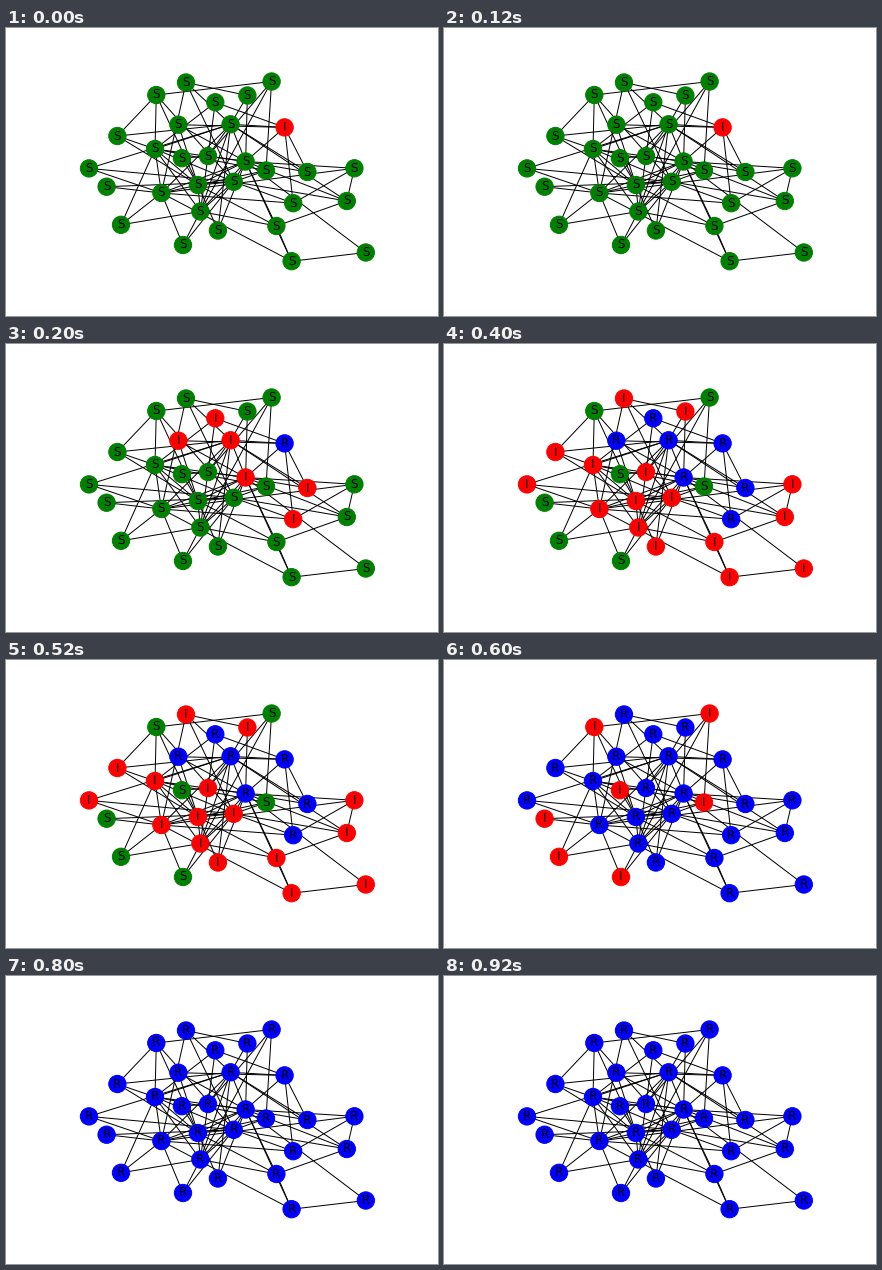
Write a matplotlib script that moves like this. It is 432x288 px and loops after 1000 ms.

```python
import math
import random
import matplotlib.pyplot as plt
from matplotlib.animation import FuncAnimation
from matplotlib.collections import LineCollection

WIDTH, HEIGHT, DPI = 432, 288, 72
STEP_MS = 200
COLORS = {"S": "green", "I": "red", "R": "blue"}

# Key points of the layout, grouped by the step at which they get infected.
WAVES = [
    [(278.6, 99.4)],
    [(209.3, 74.3), (172.4, 96.7), (224.6, 96.3), (239.6, 133.5),
     (301.4, 144), (287.2, 175.2)],
    [(180, 54.5), (241.4, 67.5), (111.4, 108), (149, 121), (202, 128),
     (348.4, 140.3), (340.8, 173), (83, 140.4), (155.4, 165), (191.9, 157),
     (227.7, 153.8), (194.4, 183.5), (211.9, 202.5), (270.4, 198),
     (285.6, 233.2), (359.8, 224.5)],
    [(150.3, 67), (265.6, 53.5), (175.9, 130.2), (260, 142.5),
     (100.6, 158.7), (115, 196.8), (177, 217)],
]
NODES = [point for wave in WAVES for point in wave]
WAVE_OF = [w for w, wave in enumerate(WAVES) for _ in wave]

HUBS = [0, 3, 4, 10, 11, 15, 16, 17, 18]
OUTLINE = [(24, 23, 9, 10, 28, 18), (7, 8), (24, 26), (22, 21, 15, 29),
           (6, 12, 13, 20, 21)]
REMOTE_Y = 220  # nodes below this line get no random links


def build_edges(seed=4):
    rng = random.Random(seed)
    edges = set()

    def link(a, b):
        edges.add((min(a, b), max(a, b)))

    for path in OUTLINE:
        for a, b in zip(path, path[1:]):
            link(a, b)
    for n, wave in enumerate(WAVE_OF[1:], 1):
        sources = [h for h in HUBS if WAVE_OF[h] == wave - 1]
        link(n, min(sources, key=lambda h: math.dist(NODES[h], NODES[n])))
        # The infection moves one link per step, so no link skips a wave.
        nearby = [h for h in HUBS[1:] if h != n and abs(WAVE_OF[h] - wave) <= 1]
        if NODES[n][1] < REMOTE_Y:
            for hub in rng.sample(nearby, 2):
                link(n, hub)
    return sorted(edges)


def state(wave, step):
    return "I" if wave == step else "R" if wave < step else "S"


fig = plt.figure(figsize=(WIDTH / DPI, HEIGHT / DPI), dpi=DPI, facecolor="white")
ax = fig.add_axes([0, 0, 1, 1])
ax.set(xlim=(0, WIDTH), ylim=(HEIGHT, 0))
ax.axis("off")

ax.add_collection(LineCollection([(NODES[a], NODES[b]) for a, b in build_edges()],
                                 colors="black", linewidths=1, zorder=1))
dots = ax.scatter(*zip(*NODES), s=300, linewidths=1, zorder=2)
labels = [ax.text(x, y, "", ha="center", va="center", fontsize=12,
                  family="DejaVu Sans", color="black", zorder=3)
          for x, y in NODES]


def update(step):
    states = [state(wave, step) for wave in WAVE_OF]
    colors = [COLORS[s] for s in states]
    dots.set_facecolor(colors)
    dots.set_edgecolor(colors)
    for label, text in zip(labels, states):
        label.set_text(text)
    return [dots, *labels]


anim = FuncAnimation(fig, update, frames=len(WAVES) + 1, interval=STEP_MS,
                     repeat=True, repeat_delay=0)
plt.show()
```
